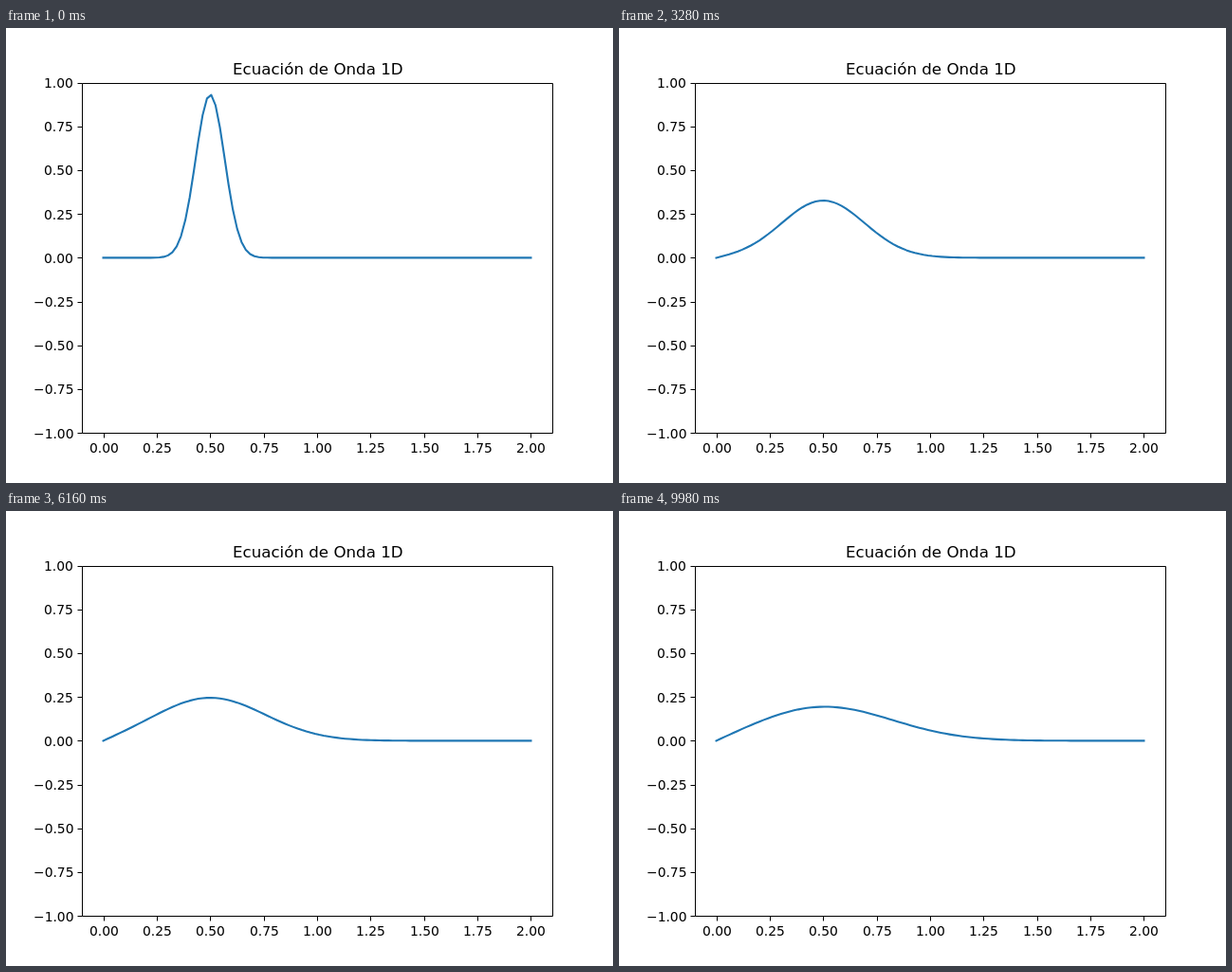
These frames come from a looping animation (640 px wide and 480 px high, 10000 ms). An HTML page with a canvas:

```html
<!DOCTYPE html>
<html lang="es">
<head>
<meta charset="utf-8">
<title>Ecuación de Onda 1D</title>
<style>
  html, body { margin: 0; width: 100%; height: 100%; overflow: hidden; background: #fff; }
  canvas { display: block; }
</style>
</head>
<body>
<canvas id="stage" width="640" height="480"></canvas>
<script>
const POINTS = 100, FRAMES = 500, FRAME_MS = 20, WARMUP = 3;
const LABEL_SIZE = 13.889, TITLE_SIZE = 16.667;
const dx = 2 / (POINTS - 1);
const rate = 0.0001 / dx ** 2;
const ctx = document.getElementById('stage').getContext('2d');

const toX = x => 102.545 + x * 225.4545;
const toY = y => 242.4 - y * 184.8;

// Places text on whole pixels; align is 0.5 for centred, 1 for right-aligned
function drawText(text, x, baseline, align, size) {
  ctx.font = `${size}px "DejaVu Sans", sans-serif`;
  const sideBearing = 0.066 * size;
  const width = ctx.measureText(text).width - sideBearing;
  ctx.fillText(text, Math.round(x - align * width), Math.round(baseline));
}

function drawAxes() {
  ctx.fillStyle = ctx.strokeStyle = '#000';
  ctx.lineWidth = 1;
  ctx.lineCap = 'butt';
  ctx.strokeRect(80.5, 58.5, 496, 369);
  ctx.beginPath();
  for (let i = 0; i <= 8; i++) {
    const xValue = i / 4, yValue = xValue - 1;
    const x = toX(xValue), y = toY(yValue);
    const tickX = Math.round(x) + 0.5, tickY = Math.round(y) + 0.5;
    ctx.moveTo(tickX, 427.5);
    ctx.lineTo(tickX, 432.5);
    ctx.moveTo(80.5, tickY);
    ctx.lineTo(75.5, tickY);
    drawText(xValue.toFixed(2), x, 448, 0.5, LABEL_SIZE);
    drawText(yValue.toFixed(2).replace('-', '\u2212'), 70.28, y + 5.4, 1, LABEL_SIZE);
  }
  ctx.stroke();
  drawText('Ecuación de Onda 1D', 328, 49, 0.5, TITLE_SIZE);
}

function drawCurve(u) {
  ctx.strokeStyle = '#1f77b4';
  ctx.lineWidth = 2.083;
  ctx.lineJoin = 'round';
  ctx.lineCap = 'square';
  ctx.beginPath();
  u.forEach((v, i) => ctx.lineTo(toX(i * dx), toY(v)));
  ctx.stroke();
}

// Explicit diffusion step with both ends held at zero
const step = u => u.map((v, i) =>
  i === 0 || i === POINTS - 1 ? 0 : v + rate * (u[i + 1] - 2 * v + u[i - 1]));

let u = Array.from({ length: POINTS }, (_, i) => Math.exp(-125 * (i * dx - 0.5) ** 2));
for (let i = 0; i < WARMUP; i++) u = step(u);
const curves = [u];
while (curves.length < FRAMES) curves.push(u = step(u));

const start = performance.now();
function draw() {
  const frame = Math.floor((performance.now() - start) / FRAME_MS) % FRAMES;
  ctx.clearRect(0, 0, 640, 480);
  drawCurve(curves[frame]);
  drawAxes();
  requestAnimationFrame(draw);
}
draw();
</script>
</body>
</html>
```
